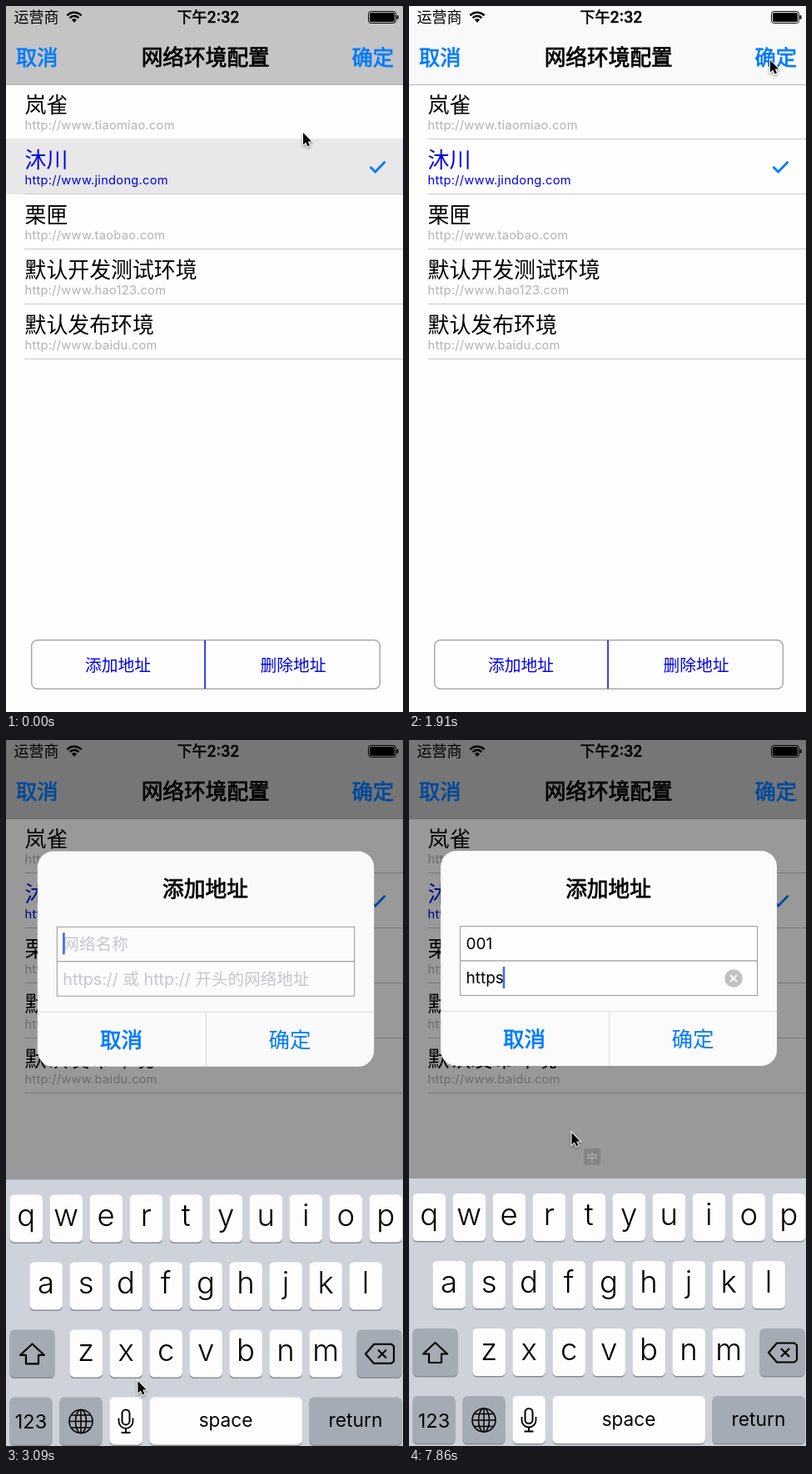
An HTML page with a canvas for the animation above (8 s loop, 477 px wide and 847 px high).

```html
<!DOCTYPE html>
<html lang="zh-CN">
<head>
<meta charset="utf-8">
<title>网络环境配置</title>
<style>
  html, body { margin: 0; width: 100%; height: 100%; overflow: hidden; background: #fefefe; }
  canvas { display: block; width: 477px; height: 847px; }
</style>
</head>
<body>
<canvas id="stage"></canvas>
<script>
const W = 477, H = 847, LOOP = 8000, STEP = 147.2;
const FONT = 'Inter, "Noto Sans CJK SC", "Noto Sans CJK", sans-serif';
const WHITE = '#fefefe', BLUE = '#007aff', LINK = '#0000e8', LINE = '#c8c7cc';
const ROWS = [
  ['岚雀', 'http://www.tiaomiao.com'],
  ['沐川', 'http://www.jindong.com'],
  ['栗匣', 'http://www.taobao.com'],
  ['默认开发测试环境', 'http://www.hao123.com'],
  ['默认发布环境', 'http://www.baidu.com']
];
const PICKED = 1;

const DISMISS = 735, PRESENT = 1390, ALERT = 2728;
const NAME_KEYS = [[3830, '0'], [4270, '00'], [4420, '001']];
const URL_KEYS = [[5470, 'h'], [5770, 'htt'], [6220, 'http'], [6670, 'https'],
  [7270, 'http'], [7410, 'htt'], [7560, 'http'], [7710, 'https']];
const NEXT_FIELD = 4870, BADGE = 6820;
const CURSOR = [[0, 357, 152], [150, 357, 152], [700, 434, 65], [1950, 434, 65],
  [2420, 158, 792], [2900, 158, 792], [3091, 158.5, 769], [3380, 195.5, 471]];

const dpr = window.devicePixelRatio || 1;
const stage = document.getElementById('stage');
const layer = document.createElement('canvas');
for (const c of [stage, layer]) { c.width = W * dpr; c.height = H * dpr; }
const main = stage.getContext('2d');
const over = layer.getContext('2d');
let g = main;

const clamp = v => Math.min(1, Math.max(0, v));
const smooth = v => v * v * (3 - 2 * v);

// Critically damped spring, 0 to 1.
function spring(ms) {
  const x = Math.max(0, ms) * 0.0208;
  const p = 1 - (1 + x) * Math.exp(-x);
  return p > 0.997 ? 1 : p;
}

function latest(keys, t) {
  let value = '';
  for (const [at, s] of keys) if (t >= at) value = s;
  return value;
}

function rect(x, y, w, h, color) {
  g.fillStyle = color;
  g.fillRect(x, y, w, h);
}

function round(x, y, w, h, r, color) {
  g.beginPath();
  g.roundRect(x, y, w, h, r);
  g.fillStyle = color;
  g.fill();
}

function stroke(color, width) {
  g.strokeStyle = color;
  g.lineWidth = width;
  g.stroke();
}

function poly(points, closed) {
  g.beginPath();
  points.forEach(([x, y]) => g.lineTo(x, y));
  if (closed) g.closePath();
}

function text(s, x, y, size, color, weight = 400, align = 'left') {
  g.font = `${weight} ${size}px ${FONT}`;
  g.textAlign = align;
  g.fillStyle = color;
  g.fillText(s, x, y);
}

// Chinese text centred vertically on cy; a thin outline gives a medium weight.
function hanzi(s, x, cy, size, color, align, medium) {
  const y = cy + size * 0.38;
  text(s, x, y, size, color, medium ? 500 : 400, align);
  if (!medium) return;
  g.strokeStyle = color;
  g.lineWidth = size * 0.03;
  g.lineJoin = 'round';
  g.strokeText(s, x, y);
  g.lineJoin = 'miter';
}

function statusBar() {
  hanzi('运营商', 9.5, 13.5, 18, '#000');
  hanzi('下午2:32', 243, 13.5, 18, '#000', 'center', true);
  for (const r of [11.8, 7.4]) {
    g.beginPath();
    g.arc(82, 19.5, r, -Math.PI * 0.76, -Math.PI * 0.24);
    stroke('#000', 2.5);
  }
  g.beginPath();
  g.moveTo(82, 20);
  g.arc(82, 19.5, 4.2, -Math.PI * 0.76, -Math.PI * 0.24);
  g.fill();
  g.beginPath();
  g.roundRect(435.5, 6.5, 33, 14, 3);
  stroke('#000', 1);
  round(437, 8, 30, 11, 1.5, '#000');
  round(469.5, 11, 2, 5, 1, '#000');
}

function navBar(title, color) {
  rect(0, 0, W, 94, color);
  rect(0, 94, W, 1, '#b2b2b2');
  hanzi(title, 239.7, 61, 25.7, '#000', 'center', true);
}

function homePage() {
  rect(0, 0, W, H, WHITE);
  navBar('网络环境设置', '#fcfcfc');
  hanzi(ROWS[PICKED][0], 416, 61, 19.5, '#f00');
  hanzi('默认开发测试环境', 20.5, 329, 17.2, '#000');
}

function listPage(navColor, selected, pressed) {
  rect(0, 0, W, H, WHITE);
  navBar('网络环境配置', navColor);
  hanzi('取消', 12, 61, 25.3, BLUE, 'left', true);
  hanzi('确定', 415.5, 61, 25.3, BLUE, 'left', true);

  ROWS.forEach(([name, url], i) => {
    const y = 66 * i, on = i === PICKED;
    if (on && selected) rect(0, 159, W, 67, '#e8e8e8');
    hanzi(name, 22.5, 118.5 + y, 25.9, on ? LINK : '#000');
    g.letterSpacing = '0.25px';
    text(url, 22.5, 148 + y, 14.7, on ? LINK : '#b2b2b2');
    g.letterSpacing = '0px';
    rect(22.5, 159 + y, W, 1, LINE);
  });
  poly([[437.5, 193], [443.7, 199], [455.5, 186.7]]);
  stroke(BLUE, 2.8);

  if (pressed) round(31, 761, 208, 58, [7, 0, 0, 7], 'rgba(0,0,255,.12)');
  g.beginPath();
  g.roundRect(30.7, 760.7, 418.6, 58.6, 7);
  stroke('#a9a9a9', 1.5);
  rect(238.3, 761, 1.5, 58, LINK);
  hanzi('添加地址', 134.5, 790, 19.8, LINK, 'center');
  hanzi('删除地址', 345, 790, 19.8, LINK, 'center');
}

function field(cy, value, hint, focused) {
  rect(61.5, cy - 20.5, 357, 41.5, '#fdfdfd');
  g.beginPath();
  g.rect(61.5, cy - 20.5, 357, 41.5);
  stroke('#9a9a9c', 1);
  if (value) text(value, 68.5, cy + 6.8, 19, '#000');
  else hanzi(hint, 68.5, cy, 19.6, '#c7c7cd');
  if (!focused) return;
  const end = value ? g.measureText(value).width - 1 : 0;
  rect(68.3 + end, cy - 13.5, 2.6, 26, '#426bf2');
  if (!value) return;
  g.beginPath();
  g.arc(390, cy + 0.5, 10.7, 0, 7);
  g.fillStyle = '#c1c1c3';
  g.fill();
  for (const d of [-4, 4]) {
    poly([[390 - d, cy - 3.5], [390 + d, cy + 4.5]]);
    stroke('#fff', 2);
  }
}

function alertBox(t) {
  round(38, 133, 404, 258, 19, '#fbfbfb');
  hanzi('添加地址', 239.5, 178, 25.7, '#000', 'center', true);
  field(244, latest(NAME_KEYS, t), '网络名称', t < NEXT_FIELD);
  field(285.5, latest(URL_KEYS, t), 'https:// 或 http:// 开头的网络地址', t >= NEXT_FIELD);
  rect(38, 325, 404, 1, '#dcdcde');
  rect(240, 325, 1, 66, '#dcdcde');
  hanzi('取消', 138.5, 358.7, 25.5, BLUE, 'center', true);
  hanzi('确定', 341, 358.7, 25.5, BLUE, 'center');
}

// Draws the alert as one group so that it fades evenly.
function showAlert(t, p, centerY) {
  const scale = 1.2 - 0.2 * p;
  over.setTransform(1, 0, 0, 1, 0, 0);
  over.clearRect(0, 0, layer.width, layer.height);
  over.setTransform(dpr, 0, 0, dpr, 0, 0);
  over.translate(240, centerY);
  over.scale(scale, scale);
  over.translate(-240, -262);
  g = over;
  alertBox(t);
  g = main;
  g.globalAlpha = p;
  g.drawImage(layer, 0, 0, W, H);
  g.globalAlpha = 1;
}

function key(x, y, w, dark) {
  round(x, y + 1.6, w, 57, 5.5, '#8b8e94');
  round(x, y, w, 57, 5.5, dark ? '#a4abb5' : '#fdfdfd');
}

function letters(s, x, y) {
  [...s].forEach((c, i) => {
    key(x + 48 * i, y, 39.5);
    text(c, x + 48 * i + 19.7, y + 38, 36.5, '#000', 350, 'center');
  });
}

function keyIcons() {
  g.lineJoin = 'round';
  poly([[31.5, 723], [46, 736.5], [39, 736.5], [39, 747], [24, 747], [24, 736.5], [17, 736.5]], true);
  stroke('#000', 2.2);

  poly([[432, 735], [442, 723.5], [463, 723.5], [466, 726], [466, 744], [463, 746.5], [442, 746.5]], true);
  stroke('#000', 2.2);
  for (const d of [-5, 5]) {
    poly([[452 - d, 730], [452 + d, 740]]);
    stroke('#000', 2.2);
  }

  for (const rx of [14, 6.5]) {
    g.beginPath();
    g.ellipse(90, 816, rx, 14, 0, 0, 7);
    stroke('#000', 1.6);
  }
  for (const [x1, y1, x2, y2] of [[76, 816, 104, 816], [90, 802, 90, 830],
    [79, 808.5, 101, 808.5], [79, 823.5, 101, 823.5]]) {
    poly([[x1, y1], [x2, y2]]);
    stroke('#000', 1.5);
  }

  g.beginPath();
  g.roundRect(139.5, 802, 9, 18, 4.5);
  stroke('#000', 2);
  g.beginPath();
  g.moveTo(135.5, 812);
  g.lineTo(135.5, 816);
  g.arc(144, 816, 8.5, Math.PI, 0, true);
  g.lineTo(152.5, 812);
  stroke('#000', 1.8);
  rect(143, 824, 2, 5.5, '#000');
  rect(138.5, 828.5, 11, 2, '#000');
  g.lineJoin = 'miter';
}

function keyboard(top, p) {
  rect(0, top, W, H - top, '#ced2da');
  if (p < 1) {
    g.save();
    g.beginPath();
    g.rect(0, top, W, H - top);
    g.clip();
    g.filter = `blur(${9 * dpr}px)`;
    round(32, 758, 204, 60, 20, `rgba(150,140,255,${0.34 * (1 - p)})`);
    g.restore();
  }
  g.save();
  g.translate(0, top - 526);
  letters('qwertyuiop', 4.5, 544);
  letters('asdfghjkl', 28.4, 625);
  letters('zxcvbnm', 76.4, 706);
  key(4.5, 706, 54, true);
  key(421.5, 706, 54, true);
  key(4.5, 787, 51, true);
  key(64.5, 787, 51, true);
  key(124.4, 787, 39.5);
  key(172.4, 787, 183.5);
  key(364.4, 787, 111.5, true);
  text('123', 30, 825, 23.5, '#000', 400, 'center');
  text('space', 264, 823, 22.6, '#000', 400, 'center');
  text('return', 420, 823, 22.8, '#000', 400, 'center');
  keyIcons();
  g.restore();
}

function badge() {
  round(210, 490, 20, 20, 3, '#848484');
  hanzi('中', 220, 500, 13, '#b2b2b2', 'center');
}

function pointer(t) {
  let i = 0;
  while (i < CURSOR.length - 2 && t >= CURSOR[i + 1][0]) i++;
  const [t0, x0, y0] = CURSOR[i], [t1, x1, y1] = CURSOR[i + 1];
  const k = smooth(clamp((t - t0) / (t1 - t0)));
  g.save();
  g.translate(x0 + (x1 - x0) * k, y0 + (y1 - y0) * k);
  poly([[0, 0], [0, 14.5], [3.3, 11.5], [5.6, 16.6], [8, 15.5], [5.8, 10.6], [10.2, 10.4]], true);
  g.shadowColor = 'rgba(0,0,0,.4)';
  g.shadowBlur = 3 * dpr;
  g.shadowOffsetY = 1.5 * dpr;
  stroke('#fff', 2);
  g.shadowColor = 'transparent';
  g.fillStyle = '#000';
  g.fill();
  g.restore();
}

function draw(now) {
  const t = now % LOOP;
  const tick = Math.floor((t + 8) / STEP) * STEP; // the screen refreshes in coarse steps
  g.setTransform(dpr, 0, 0, dpr, 0, 0);

  const leaving = tick < PRESENT;
  const shown = leaving ? 1 - spring(tick - DISMISS) : spring(tick - PRESENT);
  const shade = leaving ? (tick < DISMISS ? 1 : 0) : clamp((tick - 1905) / 250);
  const grey = Math.round(251 - 55 * shade);

  if (shown < 1) homePage();
  if (shown > 0) {
    g.save();
    g.translate(0, H * (1 - shown));
    listPage(`rgb(${grey},${grey},${grey})`, leaving, tick > 2600 && tick < 3000);
    g.restore();
  }
  statusBar();

  const p = spring(tick - ALERT);
  if (p > 0) {
    const top = H - 321 * p;
    rect(0, 0, W, H, `rgba(0,0,0,${0.4 * p})`);
    showAlert(t, p, top / 2 - 1);
    keyboard(top, p);
  }
  if (t >= BADGE) badge();
  pointer(tick);
  requestAnimationFrame(loop);
}

const begin = performance.now();
function loop() { draw(performance.now() - begin); }
loop();
</script>
</body>
</html>
```
